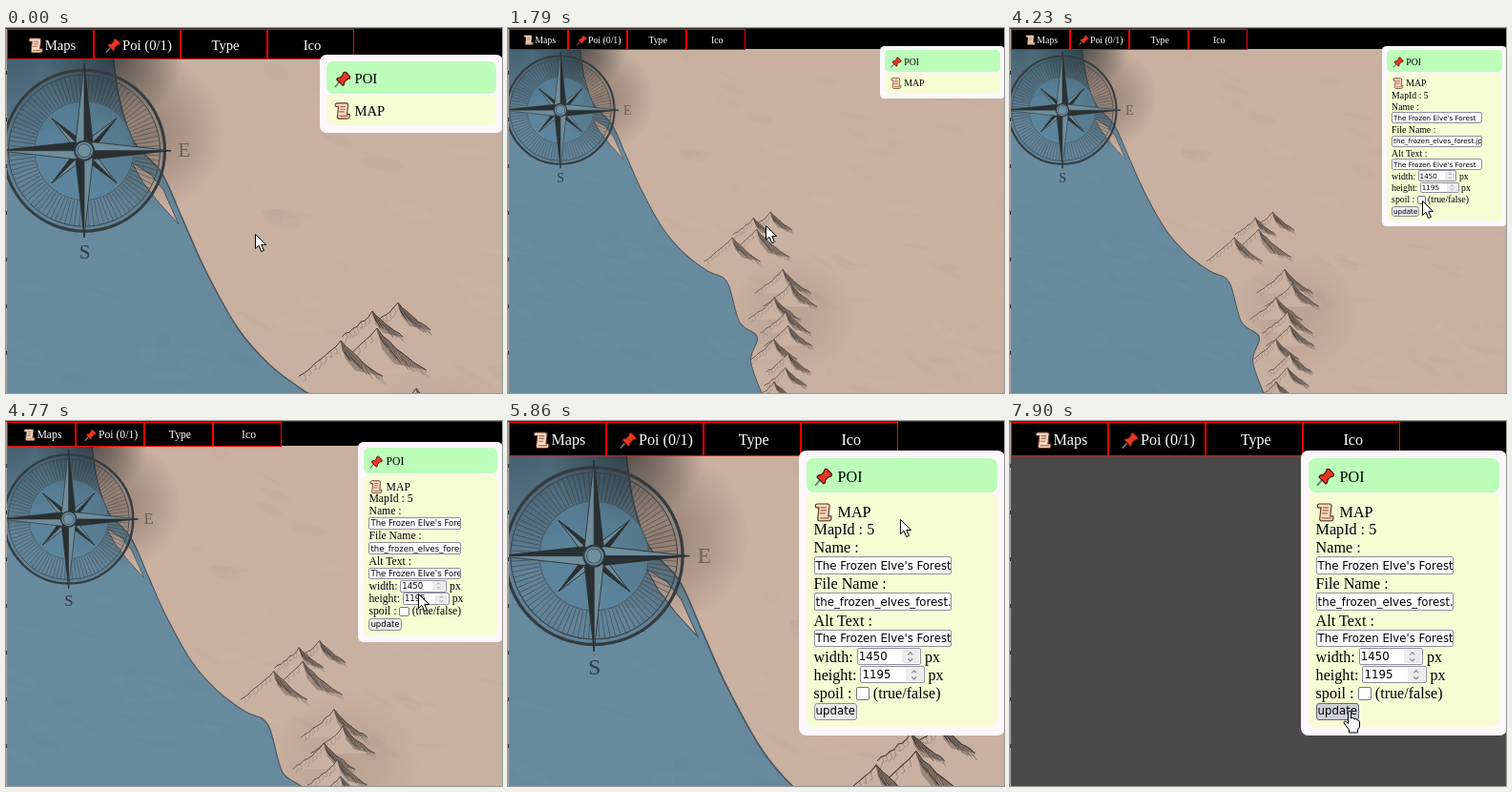
Write an HTML page with a canvas that moves like this. It is 520 px wide and 383 px high and loops after 8 s.

```html
<!DOCTYPE html>
<html lang="en">
<meta charset="utf-8">
<title>Map editor</title>
<style>
html, body { margin: 0; width: 100%; height: 100%; overflow: hidden; }
#stage { position: relative; width: 520px; height: 383px; overflow: hidden; background: #4a4a4a;
  font: calc(14.67px * var(--z))/1 "Liberation Serif", serif; color: #000; }
#stage * { box-sizing: border-box; }
canvas, .abs { position: absolute; left: 0; top: 0; }
#bar { width: 520px; height: calc(32.4px * var(--z)); background: #000; }
#cells { left: 1px; top: 1px; display: flex; height: calc(32.4px * var(--z)); color: #fff; background: #000; }
#cells div { width: var(--cell); display: flex; align-items: center; justify-content: center;
  border: 1px solid red; white-space: pre; padding: calc(2px * var(--z)) 0 0 calc(3px * var(--z)); }
#cells svg { width: 1.15em; height: 1.15em; margin-right: 1px; }
#panel { left: var(--left); right: -1px; top: calc(28px * var(--z));
  height: calc(var(--end) - 20px * var(--z)); background: #fbf7fa; border-radius: calc(7px * var(--z)); }
.box { left: calc(var(--left) + 7px * var(--z)); right: calc(7px * var(--z) - 1px);
  border-radius: calc(7px * var(--z)); }
#poi { top: calc(35px * var(--z)); height: calc(33.5px * var(--z)); background: #bcfdb9; }
#map { top: calc(69.5px * var(--z)); height: calc(var(--end) - 69.5px * var(--z)); background: #f6fcd4; }
.title { left: calc(var(--left) + 15px * var(--z)); height: calc(20px * var(--z));
  display: flex; align-items: center; }
.title svg { width: calc(18px * var(--z)); height: calc(18px * var(--z)); margin-right: calc(4px * var(--z)); }
#rows { left: calc(var(--left) + 14.3px * var(--z)); top: calc(var(--row) - var(--pitch) / 2 + .8px * var(--z)); }
#rows > div { height: var(--pitch); display: flex; align-items: center; white-space: pre; }
.field, button { font: calc(10.7px * var(--z)) "DejaVu Sans", sans-serif; height: 97%;
  border: 1px solid #8f8f9d; border-radius: 2px; background: #fff; padding: 0 1px; color: #000; }
.field { width: var(--field); overflow: hidden; display: flex; align-items: center;
  position: relative; top: calc(-.8px * var(--z)); }
.num { width: calc(61px * var(--z)); justify-content: space-between; }
.num svg { height: 90%; width: calc(16px * var(--z)); background: #ececee; }
button { background: #e9e9ed; border-radius: 3px; line-height: 1; }
button.hover { background: #cfcfd8; border-color: #67676f; }
#check { width: calc(13px * var(--z)); height: calc(13px * var(--z)); border: 1.4px solid #77777f;
  border-radius: 2px; background: #fff; }
#check.on { background: #0060df; border-color: #0060df; }
#check.hover { border: 2px solid #45454c; }
#check svg { display: none; width: 100%; height: 100%; }
#check.on svg { display: block; }
#left { width: 1px; height: 383px; background: repeating-linear-gradient(#a9a4a2 0 45px, #333 45px 49px); }
#top { width: 520px; height: 1px; background: #333; }
</style>
<div id="stage">
  <canvas id="land" width="520" height="383"></canvas>
  <div id="bar" class="abs"></div>
  <div id="cells" class="abs">
    <div><svg><use href="#scroll"/></svg>Maps</div><div><svg><use href="#pin"/></svg>Poi (0/1)</div><div>Type</div><div>Ico</div>
  </div>
  <div id="panel" class="abs" style="left:var(--left)"></div>
  <div id="poi" class="abs box" style="left:calc(var(--left) + 7px * var(--z))"></div>
  <div id="map" class="abs box" style="left:calc(var(--left) + 7px * var(--z))"></div>
  <div class="abs title" style="top:calc(43.5px * var(--z))"><svg><use href="#pin"/></svg>POI</div>
  <div class="abs title" style="top:calc(77px * var(--z))"><svg><use href="#scroll"/></svg>MAP</div>
  <div id="rows" class="abs"></div>
  <div id="left" class="abs"></div>
  <div id="top" class="abs"></div>
  <svg id="cursor" class="abs" width="24" height="30" overflow="visible" stroke-linejoin="round">
    <path id="arrow" d="M.5.5V15.5L4 12.3L6.7 18.6L9.4 17.4L6.8 11.4H11.6Z" fill="#fff" stroke="#000"/>
    <path id="beam" d="M-3-6H-1L0-5L1-6H3M0-5V5M-3 6H-1L0 5L1 6H3" fill="none" stroke="#000" stroke-width="1.3"/>
    <path id="hand" d="M-1.5 1.5Q0-1 1.5 1.5V8Q4 6 5 9Q7 7 8 10Q10 9 10.5 12V17L8.5 20V23H-.5V20L-6 13Q-6 10-3.5 11.5L-1.5 13.5Z" fill="#fff" stroke="#000"/>
  </svg>
  <svg width="0" height="0">
    <symbol id="pin" viewBox="0 0 20 20">
      <path d="M7 12L1 19" stroke="#777" stroke-width="1.8"/>
      <path d="M11 2Q13 0 16 4Q20 7 18 9L15 10L12 13Q12 17 10 17L3 10Q4 7 7 8L10 5Z" fill="#e8371f" stroke="#401010" stroke-width="1.2"/>
    </symbol>
    <symbol id="scroll" viewBox="0 0 20 20">
      <path d="M3 1H14Q17 1 16 5L15 14H18Q19 19 15 19H5Q3 18 4 15L5 5H2Q0 2 3 1Z" fill="#f6d9c0" stroke="#5c3527" stroke-width="1.2"/>
      <path d="M7 5H13M7 8H13M6 11H12M6 16H16" stroke="#a8684c" stroke-width="1.2"/>
    </symbol>
    <symbol id="spin" viewBox="0 0 16 18">
      <path d="M5 6.5L8 3.5L11 6.5M5 11.5L8 14.5L11 11.5" fill="none" stroke="#888" stroke-width="1.5"/>
    </symbol>
  </svg>
</div>
<script>
const $ = id => document.getElementById(id);
const stage = $('stage'), land = $('land'), ctx = land.getContext('2d');

const field = text => `<span class="field">${text}</span>`;
const number = n => `<span class="field num">${n}<svg><use href="#spin"/></svg></span> px`;
$('rows').innerHTML = [
  'MapId : 5',
  'Name :', field("The Frozen Elve's Forest"),
  'File Name :', field('the_frozen_elves_forest.jpg'),
  'Alt Text :', field("The Frozen Elve's Forest"),
  'width: ' + number(1450), 'height: ' + number(1195),
  'spoil : <span id="check"><svg viewBox="0 0 10 10"><path d="M1 5L4 8L9 2" fill="none" stroke="#fff" stroke-width="2"/></svg></span> (true/false)',
  '<button id="update">update</button>'
].map(row => `<div>${row}</div>`).join('');

// sizes grow with the square of the zoom, down to a readable minimum
function layout(z) {
  const grow = (base, rate) => base + rate * z * z;
  return {
    left: 521 - grow(80, 112.5),
    cell: grow(38.5, 52.5),
    row: grow(44.4, 57.1),
    pitch: Math.max(12.2, grow(6.6, 10.3)),
    field: Math.max(95, grow(43, 84))
  };
}

const ZOOMS = [[0, 1], [150, 0.9], [520, 0.8], [960, 0.67], [4770, 0.8], [4890, 0.9], [5150, 1], [5480, 1.1]];

// pointer moves: start, end, then where to
const MOVES = [
  [1730, 2170, 440, 50], [2640, 3240, 442, 187], [3240, 3420, 432, 181],
  [5420, 5920, 410, 100], [6070, 6970, 371, 292], [7170, 7410, 356, 304]
];

function line(points, close) {
  ctx.beginPath();
  points.forEach(([x, y]) => ctx.lineTo(x, y));
  if (close) ctx.closePath();
}
function spline(points) {
  const at = i => points[Math.min(Math.max(i, 0), points.length - 1)];
  for (let i = 0; i < points.length - 1; i++) {
    const [a, b, c, d] = [-1, 0, 1, 2].map(k => at(i + k));
    ctx.bezierCurveTo(b[0] + (c[0] - a[0]) / 6, b[1] + (c[1] - a[1]) / 6,
      c[0] - (d[0] - b[0]) / 6, c[1] - (d[1] - b[1]) / 6, c[0], c[1]);
  }
}
function glow(x, y, r, rgb, alpha) {
  const g = ctx.createRadialGradient(x, y, 0, x, y, r);
  g.addColorStop(0, `rgba(${rgb},${alpha})`);
  g.addColorStop(0.5, `rgba(${rgb},${alpha * 0.55})`);
  g.addColorStop(1, `rgba(${rgb},0)`);
  ctx.fillStyle = g;
  ctx.fillRect(x - r, y - r, 2 * r, 2 * r);
}

const SEA = '#678a9e', LAND = '#c9b1a1';
const COAST = [[111, 20], [119, 75], [134, 119], [163, 152], [184, 198], [209, 254], [243, 315],
  [276, 353], [313, 381], [343, 398], [362, 460], [390, 484], [380, 522], [400, 580]];
const SPIT = [[132, 141], [152, 154], [165, 170], [181, 206], [160, 183], [143, 161]];

function drawCompass() {
  const cx = 82, cy = 128.7, dark = '#2a2f31';
  ctx.save();
  ctx.translate(cx, cy);
  const circle = (r, width, color, fill = 'transparent') => {
    ctx.beginPath();
    ctx.arc(0, 0, r, 0, 7);
    ctx.fillStyle = fill;
    ctx.fill();
    ctx.lineWidth = width;
    ctx.strokeStyle = color;
    ctx.stroke();
  };
  circle(84.5, 3, '#343c40', 'rgba(40,55,65,.08)');
  circle(79.5, 1, '#3a444a');
  circle(52, 1, '#4a5a64', 'rgba(85,135,165,.45)');
  ctx.strokeStyle = 'rgba(40,48,52,.6)';
  ctx.lineWidth = 0.7;
  for (let i = 0; i < 96; i++) {
    ctx.rotate(Math.PI / 48);
    line([[0, 53], [0, 79]]);
    ctx.stroke();
  }
  const star = (length, wide) => {
    ctx.lineWidth = 0.8;
    ctx.strokeStyle = dark;
    for (let i = 0; i < 4; i++, ctx.rotate(Math.PI / 2)) {
      for (const [side, color] of [[1, dark], [-1, '#6f8d9b']]) {
        line([[0, -length], [side * wide, -wide], [0, 0]], true);
        ctx.fillStyle = color;
        ctx.fill();
        ctx.stroke();
      }
    }
  };
  ctx.rotate(Math.PI / 4);
  star(48, 6);
  ctx.rotate(-Math.PI / 4);
  star(91, 9);
  circle(10, 2, '#2f3b42', '#6f8f9f');
  circle(7, 1, '#43535c');
  ctx.font = '21px "Liberation Serif", serif';
  ctx.textAlign = 'center';
  ctx.textBaseline = 'middle';
  ctx.fillStyle = '#6b5f58';
  ctx.fillText('E', 105, 1);
  ctx.fillStyle = '#303a40';
  ctx.fillText('S', 0.5, 108);
  ctx.restore();
}

function drawPeak(x, y, size, rnd) {
  const h = size * 0.85;
  const ridge = dir => Array.from({ length: 9 }, (_, i) => {
    const k = i / 8;
    return [x + dir * size * k, y + h * k ** 0.8 + (i % 8 && (rnd() - 0.5) * 3)];
  });
  const west = ridge(-1).reverse(), east = ridge(1);
  line([...west, ...east], true);
  ctx.fillStyle = LAND;
  ctx.fill();
  line([...east, [x + size * 0.35, y + h * 0.85], [x + size * 0.1, y + h * 0.5]], true);
  ctx.fillStyle = 'rgba(50,42,38,.3)';
  ctx.fill();
  ctx.lineWidth = 1;
  ctx.strokeStyle = '#443b37';
  line([...west, ...east]);
  ctx.stroke();
  ctx.lineWidth = 0.7;
  for (let i = 0; i < 30; i++) {
    const k = i / 30, sx = x + size * k, sy = y + h * k ** 0.8, len = h * (0.2 + 0.4 * rnd()) * (1 - k / 2);
    ctx.strokeStyle = `rgba(45,38,35,${0.75 - 0.5 * k})`;
    line([[sx, sy], [sx + len * 0.1, sy + len * 0.5], [sx + len * 0.45, sy + len]]);
    ctx.stroke();
  }
  ctx.strokeStyle = 'rgba(60,50,45,.4)';
  for (const [wx, wy] of west.slice(1, 8)) {
    line([[wx, wy], [wx + 2, wy + 3 + rnd() * 4], [wx - 1, wy + 6 + rnd() * 6]]);
    ctx.stroke();
  }
}

function drawLand(z) {
  let seed = 7;
  const rnd = () => (seed = seed * 16807 % 2147483647) / 2147483647;
  ctx.setTransform(z, 0, 0, z, 0, 0);
  ctx.fillStyle = LAND;
  ctx.fillRect(0, 0, 800, 600);
  glow(445, 450, 100, '95,70,55', 0.15);

  ctx.beginPath();
  ctx.moveTo(-9, -9);
  ctx.lineTo(...COAST[0]);
  spline(COAST);
  ctx.lineTo(-9, 600);
  ctx.fillStyle = SEA;
  ctx.fill();
  ctx.strokeStyle = '#4d555b';
  ctx.lineWidth = 1.5;
  ctx.stroke();
  line(SPIT, true);
  ctx.fillStyle = LAND;
  ctx.fill();
  ctx.lineWidth = 1;
  ctx.stroke();

  for (let i = 0; i < 140; i++) {
    ctx.fillStyle = i % 2 ? 'rgba(255,235,220,.02)' : 'rgba(50,40,40,.015)';
    ctx.beginPath();
    ctx.ellipse(rnd() * 790, rnd() * 580, 6 + rnd() * 24, 2 + rnd() * 7, rnd() * 0.6, 0, 7);
    ctx.fill();
  }

  glow(112, 28, 75, '20,25,28', 0.65);
  glow(145, 110, 85, '60,45,38', 0.36);
  glow(10, 25, 120, '25,40,50', 0.45);
  drawCompass();

  for (const [x, y, size] of [[411, 288, 34], [384, 297, 32], [389, 315, 52], [351, 328, 44]])
    drawPeak(x, y, size, rnd);
  for (let i = 0; i < 9; i++)
    drawPeak(430 + 14 * Math.sin(i * 2.2), 378 + 22 * i, 44 - 1.5 * i, rnd);
}

let shownZoom;
function setZoom(z) {
  if (z === shownZoom) return;
  shownZoom = z;
  drawLand(z);
  stage.style.setProperty('--z', z);
  for (const [name, size] of Object.entries(layout(z))) stage.style.setProperty('--' + name, size + 'px');
}

function pointer(t) {
  let x = 261, y = 216;
  for (const [from, to, u, v] of MOVES) {
    const p = Math.min(Math.max((t - from) / (to - from), 0), 1), k = p * p * (3 - 2 * p);
    x += (u - x) * k;
    y += (v - y) * k;
  }
  return [x, y];
}

function render(t) {
  const z = ZOOMS.filter(s => s[0] <= t).pop()[1];
  setZoom(z);
  const { row, pitch } = layout(z), open = t >= 2110;
  stage.style.setProperty('--end', (open ? row + 10 * pitch + 15.5 * z : 102 * z) + 'px');
  $('rows').style.display = open ? '' : 'none';
  land.style.display = t < 7690 ? '' : 'none';

  const [x, y] = pointer(t);
  const onButton = t > 7230 && y > 297;
  const onCheck = t > 6850 && !onButton;
  const onText = t > 2800 && t < 3380 || t > 6300 && t < 6850;
  $('check').className = t < 4110 ? 'on' : onCheck ? 'hover' : '';
  $('update').className = onButton ? 'hover' : '';
  const shape = onButton ? 'hand' : onText ? 'beam' : 'arrow';
  for (const id of ['arrow', 'beam', 'hand']) $(id).style.display = id === shape ? '' : 'none';
  $('cursor').style.transform = `translate(${Math.round(x)}px,${Math.round(y)}px)`;
}

const start = performance.now();
function tick() {
  render((performance.now() - start) % 8000);
  requestAnimationFrame(tick);
}
tick();
</script>
</html>
```
